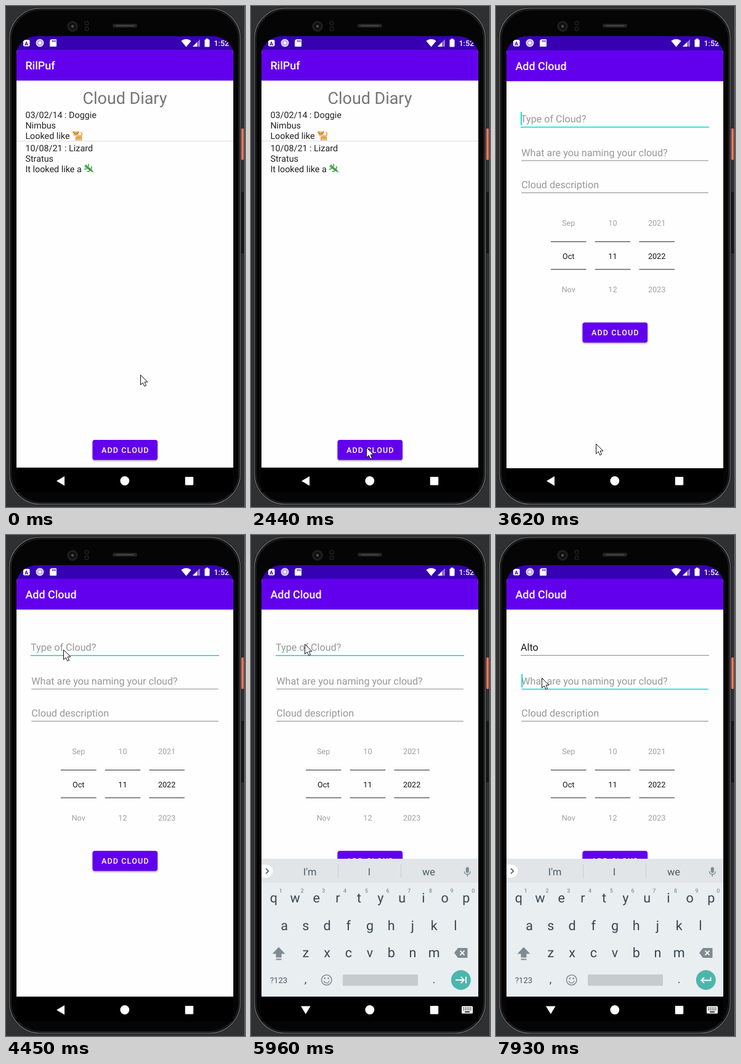
Write an HTML page with a canvas that moves like this. It is 388 by 814 pixels and loops after 8 s.

```html
<!DOCTYPE html>
<html lang="en">
<head>
<meta charset="utf-8">
<title>Cloud Diary</title>
<style>
html, body { margin: 0; width: 100%; height: 100%; overflow: hidden; background: #2e3032; }
canvas { display: block; width: 388px; height: 814px; }
</style>
</head>
<body>
<canvas id="stage"></canvas>
<script>
const W = 388, H = 814, LOOP = 8000;
const canvas = document.getElementById('stage');
const c = canvas.getContext('2d');
const dpr = window.devicePixelRatio || 1;
canvas.width = W * dpr;
canvas.height = H * dpr;

// Screen area and the size of one density-independent unit
const LEFT = 17, TOP = 49, WIDTH = 352, BOTTOM = 750, MID = 193, DP = WIDTH / 392.7;
const PURPLE = '#6200ee', DARK = '#3700b3', TEAL = '#03dac5', KEY = '#37474f', GREY = '#7f8b91';

const TICK = 120, BLINK = 490;
const PRESS = 2970, OPEN = 3500, KEYBOARD = 5030, TYPE = 6380, DONE = 6760, NEXT = 7690;
const SUGGEST = {
  '': ["I'm", 'I', 'we'],
  Al: ['Al', 'Also', 'All'],
  Alt: ['Alt', 'Alto', 'Also'],
  Alto: ['Alto', 'Altogether', 'Alton']
};
// Pointer strokes: start, duration, end point
const STROKES = [
  [840, 120, 222, 592], [960, 600, 221, 619], [1560, 500, 185, 704], [2060, 380, 187, 717],
  [2850, 260, 157, 708], [OPEN, 120, 162, 711], [3620, 240, 201, 370],
  [4010, 150, 124, 248], [4160, 150, 97, 193], [4310, 280, 87, 177], [7180, 360, 74, 232]
];

// Progress 0..1 that advances once per tick
function progress(t, start, span) {
  const steps = Math.floor((t - start) / TICK) * TICK;
  return Math.min(1, Math.max(0, t - start >= span ? 1 : steps / span));
}

function rect(x, y, w, h, fill, r = 0) {
  c.fillStyle = fill;
  c.beginPath();
  c.roundRect(x, y, w, h, r);
  c.fill();
}
function frame(inset, r, color, w) {
  c.strokeStyle = color;
  c.lineWidth = w;
  c.beginPath();
  c.roundRect(4 + inset, 2 + inset, 378 - 2 * inset, 809 - 2 * inset, r);
  c.stroke();
}
function disc(x, y, r, fill) {
  c.fillStyle = fill;
  c.beginPath();
  c.arc(x, y, r, 0, 7);
  c.fill();
}
function ring(x, y, r, color, w, a = 0, b = 7) {
  c.strokeStyle = color;
  c.lineWidth = w;
  c.beginPath();
  c.arc(x, y, r, a, b);
  c.stroke();
}
function poly(points, fill) {
  c.fillStyle = fill;
  c.beginPath();
  points.forEach(([x, y]) => c.lineTo(x, y));
  c.closePath();
  c.fill();
}
function line(points, color, w) {
  c.strokeStyle = color;
  c.lineWidth = w;
  c.beginPath();
  points.forEach(([x, y]) => c.lineTo(x, y));
  c.stroke();
}
// Open arrowhead with its tip at x, y; positive size points right
function chevron(x, y, size, color, w) {
  line([[x - size, y - Math.abs(size)], [x, y], [x - size, y + Math.abs(size)]], color, w);
}
// Triangle with its tip at x, y; (dx, dy) leads to the middle of its base
function triangle(x, y, dx, dy, half, fill) {
  const n = half / Math.hypot(dx, dy);
  poly([[x, y], [x + dx - dy * n, y + dy + dx * n], [x + dx + dy * n, y + dy - dx * n]], fill);
}
function text(s, x, y, size, color, align = 'left', weight = 400, gap = 0) {
  c.font = `${weight} ${size}px Roboto, sans-serif`;
  c.letterSpacing = gap + 'px';
  c.textAlign = align;
  c.fillStyle = color;
  c.fillText(s, x, y);
}
function raised(x, y, w, h, r, depth) {
  c.save();
  c.shadowColor = 'rgba(0,0,0,.38)';
  c.shadowBlur = 2 * depth * dpr;
  c.shadowOffsetY = depth * dpr;
  rect(x, y, w, h, PURPLE, r);
  c.restore();
}

function drawPhone() {
  rect(0, 0, W, H, '#2e3032');
  rect(387, 0, 1, H, '#707070');
  rect(4, 2, 378, 809, '#050505', 52);
  frame(1.5, 50, '#68696b', 1.6);
  frame(4, 48, '#1d1d1e', 2);
  rect(382, 199, 4, 51, '#f0735a', 1);
  rect(382, 302, 4, 100, '#151617', 1);
  disc(108, 33, 9, '#1c1c1d');
  disc(108, 33, 5, '#0c0c0d');
  disc(108, 33, 2.4, '#48494b');
  for (const y of [28, 37]) ring(131, y, 3, '#202021', 1.5);
  rect(173, 29, 40, 6, '#242425', 3);
  rect(178, 31, 30, 2, '#444446', 1);
}

function drawStatus() {
  rect(28, 55, 10.5, 10.5, '#fff', 2);
  text('A', 33.2, 63.6, 8.5, DARK, 'center', 700);
  disc(55, 60, 6.5, '#b9a5e6');
  ring(55, 60, 5.4, '#e4dcf7', 1.6);
  disc(55, 60, 2.4, '#fff');
  rect(71, 54, 11, 12, '#fff', [4, 1, 1, 1]);
  for (let i = 0; i < 3; i++) rect(75 + i * 2.3, 55.5, 1.2, 3, DARK);
  c.fillStyle = '#fff';
  c.beginPath();
  c.moveTo(292.5, 66.5);
  c.arc(292.5, 66.5, 12.8, -Math.PI * 0.72, -Math.PI * 0.28);
  c.fill();
  poly([[315, 54], [315, 66], [303, 66]], '#8e70d2');
  poly([[310, 59], [310, 66], [303, 66]], '#fff');
  rect(322.5, 54.5, 8, 12, '#fff', 1);
  rect(324.7, 53, 3.6, 2, '#fff');
  text('1:52', 337.5, 65, 14 * DP, '#fff', 'left', 500);
}

function drawPage(title) {
  rect(LEFT, 71, WIDTH, BOTTOM - 71, '#fefefe');
  raised(LEFT, 71, WIDTH, 50, 0, 1.4);
  text(title, 31.4, 103, 20 * DP, '#fff', 'left', 500);
}

function drawButton(y, press = 0) {
  const x = 140.5, w = 105.5, h = 32.5;
  raised(x, y, w, h, 3.6, 1.5 + press * 0.8);
  rect(x, y, w, h, `rgba(255,255,255,${press * 0.05})`, 3.6);
  text('ADD CLOUD', 155, y + 21.2, 14 * DP, '#fff', 'left', 500, 1.25 * DP);
}

function drawDog(x, y) {
  const tan = '#f2ad4e';
  ring(x + 12, y + 5, 3.4, tan, 2, -1.2, 1.2);
  rect(x + 5, y + 7, 10, 5, tan, 2);
  for (let i = 0; i < 4; i++) rect(x + 5 + i * 2.7, y + 10, 1.8, 5.5, '#dd9236');
  for (const side of [-1, 1]) disc(x + 5.5 + side * 3.4, y + 2.2, 1.8, '#c9822f');
  disc(x + 5.5, y + 5, 4.2, tan);
  disc(x + 5.5, y + 7, 2.3, '#fbe3bd');
  for (const side of [-1, 1]) disc(x + 5.5 + side * 1.8, y + 4.4, 0.8, '#4a3325');
  disc(x + 5.5, y + 6.4, 0.8, '#4a3325');
}

function drawLizard(x, y) {
  c.save();
  c.translate(x + 8, y + 7.5);
  c.rotate(0.68);
  const green = '#43a047';
  for (const lx of [-3, 3]) for (const side of [-1, 1]) line([[lx, 0], [lx - 1, side * 4], [lx - 3, side * 5.5]], green, 1.5);
  rect(-7, -1.7, 12, 3.4, green, 1.7);
  triangle(10, 0, -6, 0, 1.6, green);
  disc(-6.5, 0, 2.4, '#54b558');
  c.restore();
}

function drawDiary(t) {
  drawPage('RilPuf');
  text('Cloud Diary', MID, 158.7, 30 * DP, '#757575', 'center');
  const entries = [
    ['03/02/14 : Doggie', 'Nimbus', 'Looked like'],
    ['10/08/21 : Lizard', 'Stratus', 'It looked like a']
  ];
  entries.forEach((rows, i) => rows.forEach((row, j) =>
    text(row, 31.4, 181.7 + i * 54 + j * 17, 16 * DP, '#212121')));
  drawDog(108, 203);
  drawLizard(127, 257);
  rect(LEFT, 219, WIDTH, 1, '#dcdcdc');
  drawButton(705, progress(t, PRESS - TICK, 3 * TICK));
}

function drawField(y, x, hint, value, focused, caretOn) {
  text(value || hint, x, y - 6.7, 18 * DP, value ? '#1c1c1c' : '#979797');
  const end = x + (value ? c.measureText(value).width : 0);
  if (value && focused) rect(x, y - 5, end - x, 1, '#333');
  rect(x, y, 2 * (MID - x), focused ? 1.6 : 1, focused ? TEAL : '#8a8a8a');
  if (focused && caretOn) rect(end, y - 24, 1.8, 22, TEAL);
}

function drawForm(t, value) {
  const second = t >= NEXT;
  const reset = [NEXT, DONE, TYPE, OPEN].find(time => t >= time);
  const caretOn = Math.floor((t - reset) / BLINK) % 2 === 0;
  c.save();
  c.translate(0, 4 * (1 - progress(t, OPEN, 2 * TICK)) ** 2);
  drawPage('Add Cloud');
  drawField(195, 40, 'Type of Cloud?', value, !second, caretOn);
  drawField(249.7, 41.3, 'What are you naming your cloud?', '', second, caretOn);
  drawField(302, 41.3, 'Cloud description', '', false, false);
  const dates = [['Sep', 'Oct', 'Nov'], ['10', '11', '12'], ['2021', '2022', '2023']];
  dates.forEach((column, i) => {
    const x = MID - 3.6 + (i - 1) * 71.7;
    column.forEach((s, j) => text(s, x, 356.4 + j * 53.8, 14 * DP, j === 1 ? '#111' : '#a0a0a0', 'center'));
    for (const y of [381, 426]) rect(x - 28.7, y, 57.5, 1.8, '#7b7b7b');
  });
  drawButton(513.2);
  c.restore();
}

function drawKeys() {
  ['qwertyuiop', 'asdfghjkl', 'zxcvbnm'].forEach((keys, row) => [...keys].forEach((key, i) => {
    const x = MID + (i - (keys.length - 1) / 2) * 34.72;
    text(key, x, 597.3 + row * 44.2, 24 * DP, KEY, 'center');
    if (row === 0) text((i + 1) % 10, x + 11.6, 581, 10 * DP, '#6b7a81', 'center');
  }));
  text('?123', 45, 728, 13, '#455a64', 'center');
  text(',', 88.5, 728, 18, KEY, 'center');
  text('.', 297, 728, 18, KEY, 'center');
  rect(149, 714, 122, 18.5, '#c6cbce', 1.5);

  // Shift, backspace, smiley
  triangle(45, 669.5, 0, 11, 10.5, GREY);
  rect(40.5, 680, 9, 6.5, GREY);
  rect(40.5, 688.5, 9, 2, GREY);
  triangle(330, 679, 6, 0, 8, GREY);
  rect(335.5, 671, 16, 16, GREY, 1);
  for (const s of [-1, 1]) line([[339.5, 679 - s * 3.7], [346.5, 679 + s * 3.7]], '#fff', 1.7);
  ring(122.7, 723, 8.3, GREY, 1.5);
  ring(122.7, 723.5, 4.4, GREY, 1.4, 0.2, Math.PI - 0.2);
  for (const s of [-1, 1]) disc(122.7 + s * 2.9, 720.4, 1.3, GREY);
}

function drawEnter(isReturn) {
  disc(340.8, 723, 16, '#4db6ac');
  if (isReturn) {
    line([[348.5, 718.5], [348.5, 723.5], [333.5, 723.5]], '#fff', 1.9);
    chevron(333.3, 723.5, -4.7, '#fff', 1.9);
  } else {
    line([[332, 723], [345.5, 723]], '#fff', 1.9);
    chevron(345.8, 723, 5, '#fff', 1.9);
    rect(348, 717.5, 1.9, 11, '#fff');
  }
}

function drawKeyboard(t, value) {
  const shown = progress(t, KEYBOARD, TICK), moved = t >= NEXT + TICK;
  c.save();
  c.globalAlpha = 0.85 + 0.15 * shown;
  c.translate(0, 9.5 * (1 - shown));
  c.beginPath();
  c.rect(LEFT, 526, WIDTH, BOTTOM - 526);
  c.clip();
  rect(LEFT, 526, WIDTH, 224, '#e9eef1');
  rect(LEFT, 526, WIDTH, 39, '#e1e5e8');
  SUGGEST[moved ? '' : value].forEach((s, i) =>
    text(s, 95.5 + i * 96.5, 552.8, 16.4, '#4d5b62', 'center'));
  for (const side of [-1, 1]) rect(192 + side * 51, 535, 1, 22, '#c7cdd0');
  rect(8, 535.5, 27.5, 21, '#fff', 10.5);
  chevron(28.3, 546, 4.2, '#455a64', 1.7);
  rect(348.8, 539.5, 5, 9.5, GREY, 2.5);
  ring(351.3, 546.5, 5, GREY, 1.3, 0, Math.PI);
  rect(350.6, 551.5, 1.4, 3.5, GREY);
  drawKeys();
  drawEnter(moved);
  c.restore();
}

function drawNav(typing) {
  if (typing) {
    triangle(88.8, 778.5, 0, -13, 7.8, '#fff');
    rect(342, 765.5, 18, 12, '#fff', 1.5);
    for (let i = 0; i < 10; i++) rect(344.3 + (i % 5) * 2.9, 767.7 + (i > 4) * 3, 1.6, 1.6, '#000');
    rect(347, 774, 8, 1.6, '#000');
  } else {
    triangle(82, 771.7, 13, 0, 7.7, '#fff');
  }
  disc(192.8, 771.5, 7.4, '#fff');
  rect(290.8, 765, 13.4, 13.4, '#fff', 0.8);
}

function drawPointer(t) {
  let x = 218, y = 599;
  for (const [start, span, toX, toY] of STROKES) {
    const p = progress(t, start, span);
    x += (toX - x) * p;
    y += (toY - y) * p;
  }
  c.save();
  c.translate(Math.round(x) + 0.5, Math.round(y) + 0.5);
  const arrow = new Path2D('M0 0V16L3.7 12.6L6.3 18.3L9 17.1L6.5 11.5H11.4Z');
  c.fillStyle = '#fff';
  c.fill(arrow);
  c.strokeStyle = '#111';
  c.lineWidth = 1;
  c.stroke(arrow);
  c.restore();
}

function draw(t) {
  const letters = t < TYPE ? 0 : 2 + (t >= DONE - TICK) + (t >= DONE);
  const value = 'Alto'.slice(0, letters);
  const typing = t >= KEYBOARD;
  c.setTransform(dpr, 0, 0, dpr, 0, 0);
  c.textRendering = 'geometricPrecision';
  drawPhone();
  rect(LEFT, BOTTOM, WIDTH, 40, '#000');
  c.save();
  c.beginPath();
  c.roundRect(LEFT, TOP, WIDTH, BOTTOM - TOP + 4, [{ x: 34, y: 30 }, { x: 34, y: 30 }, 0, 0]);
  c.clip();
  rect(LEFT, TOP, WIDTH, 27, DARK);
  if (t < OPEN) drawDiary(t);
  else drawForm(t, value);
  drawStatus();
  c.restore();
  if (typing) drawKeyboard(t, value);
  drawNav(typing);
  drawPointer(t);
}

function tick() {
  draw(performance.now() % LOOP);
  requestAnimationFrame(tick);
}
tick();
</script>
</body>
</html>
```
